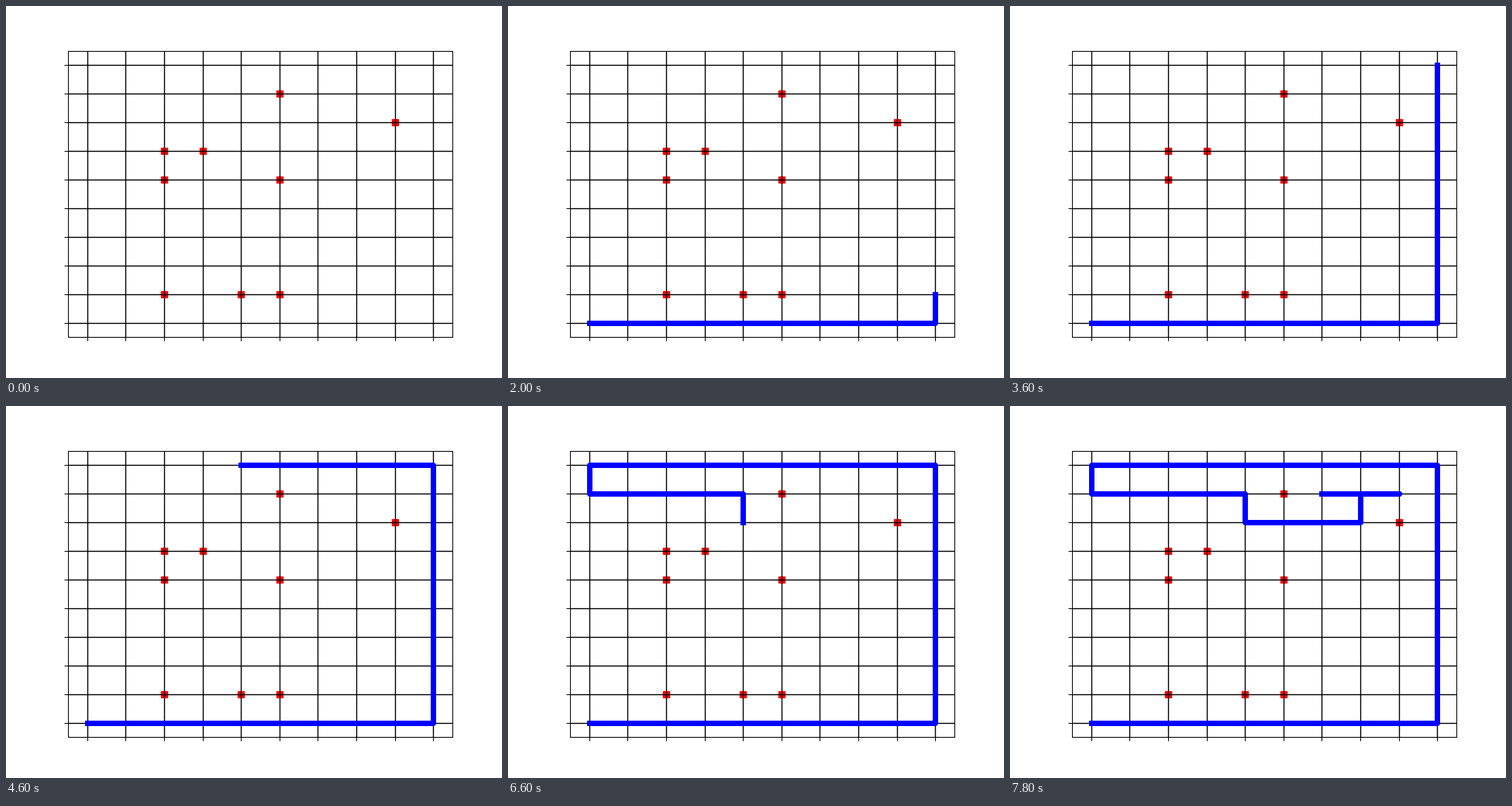
Recreate the animation shown at these times as a matplotlib script. Size 640 by 480 pixels, loop 8 s.

```python
import matplotlib.pyplot as plt
from matplotlib.animation import FuncAnimation

SIZE = 10
STEP_MS = 200
FRAMES = 40
HAIRLINE = 0.72  # one pixel, in points
BLOCKS = [(2, 1), (4, 1), (5, 1), (2, 5), (5, 5), (2, 6), (3, 6), (8, 7), (5, 8)]
RIGHT, UP, LEFT, DOWN = (1, 0), (0, 1), (-1, 0), (0, -1)


def explore(steps):
    """Depth-first search of the grid: cells in the order they are reached."""
    visited = [(0, 0)]
    stack = [(0, 0)]
    while stack and len(visited) < steps:
        x, y = stack[-1]
        for dx, dy in (RIGHT, UP, LEFT, DOWN):
            cell = x + dx, y + dy
            inside = 0 <= cell[0] < SIZE and 0 <= cell[1] < SIZE
            if inside and cell not in BLOCKS and cell not in visited:
                visited.append(cell)
                stack.append(cell)
                break
        else:
            stack.pop()
    return visited


PATH = explore(FRAMES)

fig, ax = plt.subplots(figsize=(6.4, 4.8), dpi=100)
ax.set_xlim(-0.5, SIZE - 0.5)
ax.set_ylim(-0.5, SIZE - 0.5)
ax.set_xticks(range(SIZE), [])
ax.set_yticks(range(SIZE), [])
ax.tick_params(width=HAIRLINE)
ax.spines[:].set_linewidth(HAIRLINE)
ax.grid(color="black", linestyle="-", linewidth=1)

ax.scatter(*zip(*BLOCKS), color="red", marker="s")
trail, = ax.plot([], [], color="blue", linewidth=5)


def draw(frame):
    if frame:
        trail.set_data(*zip(*PATH[:frame + 1]))
    else:
        trail.set_data([], [])
    return (trail,)


anim = FuncAnimation(fig, draw, frames=FRAMES, interval=STEP_MS,
                     repeat=True, repeat_delay=0)
plt.show()
```
